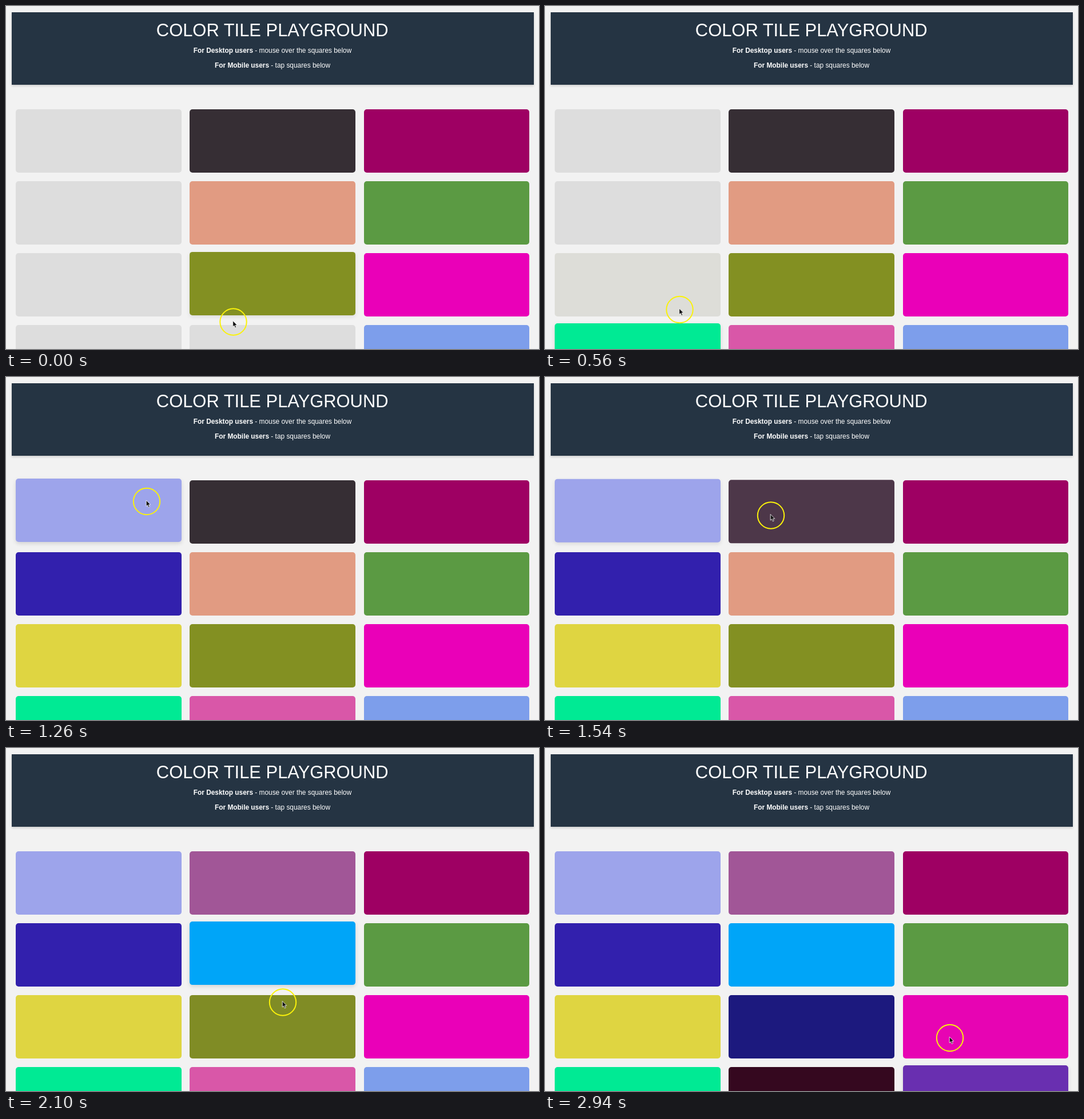
Animation of 932 by 601 pixels, one loop 3040 ms. Source, as an HTML page:

```html
<!DOCTYPE html>
<html lang="en">
<head>
<meta charset="utf-8">
<title>Color Tile Playground</title>
<style>
  html, body { margin: 0; width: 100%; height: 100%; overflow: hidden; background: #f2f2f2; }
  body { position: relative; font-family: "Liberation Sans", Arial, sans-serif; }
  header {
    position: absolute; left: 9.5px; top: 11px; width: 913px; height: 127px;
    background: #253443; box-shadow: 0 2px 4px rgba(0, 0, 0, .16);
  }
  .tile { position: absolute; width: 289.5px; height: 111px; border-radius: 5px; }
  svg { position: absolute; left: 0; top: 0; }
  text { fill: #fff; text-anchor: middle; font-size: 11.88px; }
  .title { font-size: 30.9px; }
  .bold { font-weight: bold; }
</style>
</head>
<body>
<header></header>
<div id="grid"></div>
<svg width="932" height="601" viewBox="0 0 932 601">
  <text class="title" x="465.7" y="53">COLOR TILE PLAYGROUND</text>
  <text x="466" y="82"><tspan class="bold">For Desktop users</tspan> - mouse over the squares below</text>
  <text x="466" y="108"><tspan class="bold">For Mobile users</tspan> - tap squares below</text>
  <g id="pointer">
    <circle r="23.2" fill="none" stroke="#faf20a" stroke-width="2"/>
    <path d="M-.8-2V8.6L1.6 6.4 3.3 10.4 5.2 9.6 3.5 5.8H6.8Z" fill="#111" stroke="#fff" stroke-width=".8"/>
  </g>
</svg>
<script>
const LOOP = 3040, STEP = 140, FADE = 200, LIFT = 3;

// Starting colours, row by row
const START = [
  '#dddddd', '#362e34', '#9e0063',
  '#dddddd', '#e19b82', '#5b9a43',
  '#dddddd', '#839022', '#ea00b8',
  '#dddddd', '#dddddd', '#7d9eeb'
];

// Time of entry, tile index, new colour; a hover lasts until the next entry
const HOVERS = [
  [-600, 7, '#839022'],
  [-40, -1],
  [90, 10, '#d957a8'],
  [310, 9, '#00ea94'],
  [550, 6, '#dfd541'],
  [804, 3, '#3220ad'],
  [1010, 0, '#9da4eb'],
  [1507, 1, '#a15697'],
  [1770, 4, '#00a5f8'],
  [2090, 7, '#1c197e'],
  [2440, 10, '#35081f'],
  [2655, 11, '#692fb0'],
  [2930, 8, '#8a7d2a']
];

// Time, x, y of the pointer
const PATH = [
  [0, 397.5, 553.5], [140, 381, 575], [280, 330, 590], [420, 273, 580],
  [560, 235.5, 532], [700, 218, 462], [840, 209, 382], [980, 204, 305],
  [1120, 212, 246], [1260, 246, 218], [1400, 316, 222], [1540, 395, 242.5],
  [1820, 454, 325], [2100, 484, 445.5], [2380, 530, 553], [2520, 568, 581],
  [2660, 630, 597], [2800, 685, 572], [2940, 708, 508]
];

const rgb = hex => [1, 3, 5].map(i => parseInt(hex.substr(i, 2), 16));
const mix = (a, b, k) => a + (b - a) * k;
const bezier = (s, a, b) => 3 * s * (1 - s) * (1 - s) * a + 3 * s * s * (1 - s) * b + s * s * s;

// CSS "ease" curve
function ease(p) {
  if (p <= 0) return 0;
  if (p >= 1) return 1;
  let lo = 0, hi = 1;
  for (let i = 0; i < 20; i++) {
    const mid = (lo + hi) / 2;
    if (bezier(mid, .25, .25) < p) lo = mid; else hi = mid;
  }
  return bezier(lo, .1, 1);
}

const grid = document.getElementById('grid');
const pointer = document.getElementById('pointer');
const tiles = START.map((color, i) => {
  const el = document.createElement('div');
  el.className = 'tile';
  el.style.left = 17 + (i % 3) * 304.3 + 'px';
  el.style.top = 181.3 + Math.floor(i / 3) * 126 + 'px';
  grid.append(el);
  return { el, base: rgb(color) };
});

function pointerAt(t) {
  let i = 0;
  while (i < PATH.length - 2 && t >= PATH[i + 1][0]) i++;
  const a = PATH[i], b = PATH[i + 1];
  const k = (t - a[0]) / (b[0] - a[0]);
  return [mix(a[1], b[1], k), mix(a[2], b[2], k)];
}

function draw(t) {
  const colors = tiles.map(tile => tile.base);
  const lifts = tiles.map(() => 0);
  HOVERS.forEach(([start, id, color], i) => {
    if (id < 0 || t < start) return;
    const end = i + 1 < HOVERS.length ? HOVERS[i + 1][0] : Infinity;
    const enter = ease((t - start) / FADE);
    const goal = rgb(color);
    colors[id] = colors[id].map((c, n) => mix(c, goal[n], enter));
    lifts[id] = Math.max(lifts[id], enter * (1 - ease((t - end) / FADE)));
  });
  tiles.forEach(({ el }, i) => {
    el.style.background = `rgb(${colors[i].map(Math.round)})`;
    el.style.transform = `translateY(${-LIFT * lifts[i]}px)`;
    el.style.boxShadow = `0 3px 7px rgba(0,0,0,${.13 * lifts[i]})`;
  });
  pointer.setAttribute('transform', `translate(${pointerAt(t)})`);
}

const begin = performance.now();
function tick() {
  const t = (performance.now() - begin) % LOOP;
  draw(Math.floor(t / STEP) * STEP);
  requestAnimationFrame(tick);
}
tick();
</script>
</body>
</html>
```
